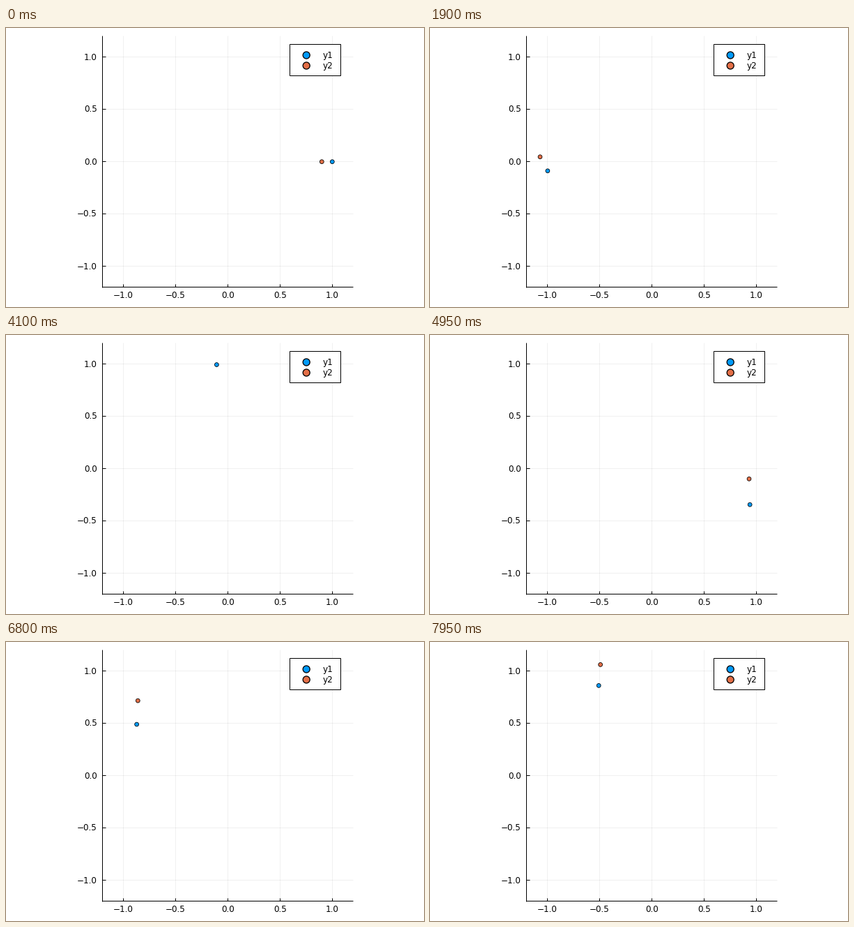
Animation, 600 px wide and 400 px high, one loop 8 s. Source, as a matplotlib script:

```python
import numpy as np
import matplotlib.pyplot as plt
from matplotlib.animation import FuncAnimation
from matplotlib.patches import Circle, Rectangle

W, H, DPI = 600, 400, 100
PX = 72 / DPI                      # points per pixel
CX, CY, UNIT, HALF = 318.3, 191.7, 150, 180
LEFT, RIGHT, TOP, BOTTOM = CX - HALF, CX + HALF, CY - HALF, CY + HALF
BLUE, ORANGE = "#009afa", "#e36f47"
FRAMES, STEP = 160, 2 * np.pi / 25.1


def to_px(x, y):
    return CX + UNIT * x, CY - UNIT * y


def orbit(k):
    """First point: steady motion on the unit circle."""
    return np.cos(STEP * k), np.sin(STEP * k)


def drift(k):
    """Offset of the second point: x settles, y swells and fades."""
    u = k / 101
    dx = .02 - .12 * np.exp(-(k / 80) ** 1.8)
    dy = .246 * (u * np.exp(1 - u)) ** 1.72
    return dx, dy


fig = plt.figure(figsize=(W / DPI, H / DPI), dpi=DPI, facecolor="white")
ax = fig.add_axes([0, 0, 1, 1])
ax.set_xlim(0, W)
ax.set_ylim(H, 0)
ax.axis("off")


def line(x0, y0, x1, y1, **kw):
    # half a pixel up, so that snapping picks the row holding y
    ax.plot([x0, x1], [y0 - .5, y1 - .5], lw=PX, color="black",
            solid_capstyle="butt", **kw)


def label(x, y, s, ha):
    ax.text(x, y, s, ha=ha, va="baseline", fontsize=12 * PX,
            family="DejaVu Sans", color="black", zorder=6)


def dot(x, y, r, color, width, z):
    return ax.add_patch(Circle((x, y), r, fc=color, ec="black",
                               lw=width * PX, zorder=z))


# Grid, ticks and labels
for v in np.linspace(-1, 1, 5):
    x, y = to_px(v, v)
    text = f"{v:.1f}".replace("-", "\u2212")
    line(x, TOP, x, BOTTOM, alpha=.06, zorder=1)
    line(LEFT, y, RIGHT, y, alpha=.06, zorder=1)
    line(x, BOTTOM, x, BOTTOM - 4, zorder=2)
    line(LEFT, y, LEFT + 4.4, y, zorder=2)
    label(x, 387, text, "center")
    label(130.8, to_px(v, v)[1] + 3.8, text, "right")
line(LEFT, TOP, LEFT, BOTTOM + .5, zorder=2)
line(LEFT, BOTTOM, RIGHT, BOTTOM, zorder=2)

# Legend
ax.add_patch(Rectangle((407.3, 23.2), 73, 45.2, fc="white", ec="black",
                       lw=PX, zorder=5))
for y, color, name in ((39, BLUE, "y1"), (54, ORANGE, "y2")):
    dot(431.2, y, 5, color, 1.3, 6)
    label(455, y + 4, name, "left")

# Moving points, clipped to the plot area
first = dot(*to_px(1, 0), 2.9, BLUE, .8, 3)
second = dot(*to_px(.9, 0), 2.9, ORANGE, .8, 4)
for point in (first, second):
    point.set_clip_path(Rectangle((LEFT, TOP), 2 * HALF, 2 * HALF,
                                  transform=ax.transData))


def update(k):
    x, y = orbit(k)
    dx, dy = drift(k)
    first.center = to_px(x, y)
    second.center = to_px(x + dx, y + dy)
    return first, second


anim = FuncAnimation(fig, update, frames=FRAMES, interval=50,
                     init_func=lambda: update(0), repeat=True, repeat_delay=0)
plt.show()
```
